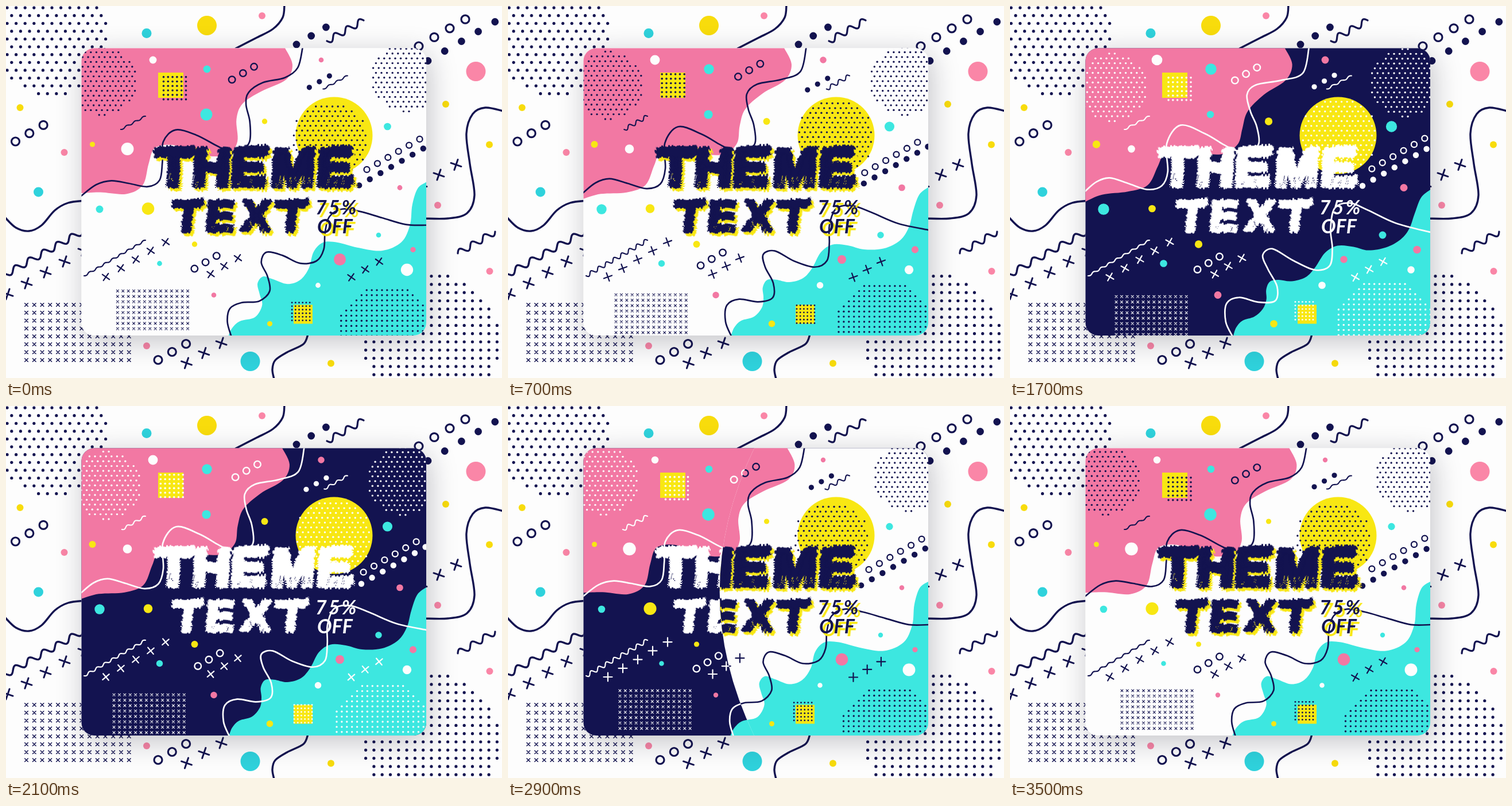
These frames come from a looping animation (864x648 px, 3600 ms). An HTML page with a canvas:

```html
<!DOCTYPE html>
<html lang="en">
<head>
<meta charset="utf-8">
<title>Theme text</title>
<style>
html, body { margin: 0; width: 100%; height: 100%; overflow: hidden; background: #fdfdfd; }
canvas { display: block; }
</style>
</head>
<body>
<canvas id="stage" width="864" height="648" role="img" aria-label="THEME TEXT 75% OFF"></canvas>
<script>
const W = 864, H = 648, LOOP = 3600, TAU = Math.PI * 2;
const g = document.getElementById('stage').getContext('2d');
const NAVY = '#131350', WHITE = '#fdfdfd', PINK = '#f278a3', CYAN = '#3de7e0', YELLOW = '#f8e713';
const BG_PINK = '#fa86a7', BG_CYAN = '#2fd2dc', BG_YELLOW = '#f8dc0c';
const CARD = { x: 131.5, y: 73.5, w: 600.5, h: 500.5, r: 22 };

function disc(x, y, r, color) {
  g.fillStyle = color;
  g.beginPath();
  g.arc(x, y, r, 0, TAU);
  g.fill();
}

function stroke(color, width) {
  g.strokeStyle = color;
  g.lineWidth = width;
  g.stroke();
}

function ring(x, y, r, color, width) {
  g.beginPath();
  g.arc(x, y, r, 0, TAU);
  stroke(color, width);
}

// Repeats a mark n times along a straight row.
function row(n, x, y, dx, dy, mark) {
  for (let i = 0; i < n; i++) mark(x + i * dx, y + i * dy);
}

function plus(x, y, arm, angle, color, width) {
  const c = Math.cos(angle) * arm, s = Math.sin(angle) * arm;
  g.beginPath();
  g.moveTo(x - c, y - s); g.lineTo(x + c, y + s);
  g.moveTo(x + s, y - c); g.lineTo(x - s, y + c);
  stroke(color, width);
}

function crosses(x, y, gap, arm, color, width) {
  for (let j = 0; j < 8; j++)
    row(14, x, y + j * gap, gap, 0, (a, b) => plus(a, b, arm, Math.PI / 4, color, width));
}

// A round patch of dots, in a square or staggered grid.
function dotPatch(cx, cy, R, dx, dy, r, color, stagger) {
  const n = Math.ceil(R / dy);
  for (let j = -n; j <= n; j++)
    for (let i = -n; i <= n; i++) {
      const x = (i + (stagger && j & 1 ? 0.5 : 0)) * dx, y = j * dy;
      if (x * x + y * y <= R * R) disc(cx + x, cy + y, r, color);
    }
}

function wave(x1, y1, x2, y2, turns, amp, color, width) {
  const dx = x2 - x1, dy = y2 - y1, len = Math.hypot(dx, dy), steps = turns * 16;
  g.beginPath();
  for (let i = 0; i <= steps; i++) {
    const u = i / steps, a = amp * Math.sin(u * turns * TAU);
    g.lineTo(x1 + dx * u - dy / len * a, y1 + dy * u + dx / len * a);
  }
  stroke(color, width);
}

// Smooth path through a flat list of coordinates.
function curve(p) {
  const n = p.length / 2, at = i => {
    const k = 2 * Math.max(0, Math.min(n - 1, i));
    return [p[k], p[k + 1]];
  };
  g.beginPath();
  g.moveTo(p[0], p[1]);
  for (let i = 0; i < n - 1; i++) {
    const [a, b, c, d] = [at(i - 1), at(i), at(i + 1), at(i + 2)];
    g.bezierCurveTo(b[0] + (c[0] - a[0]) / 6, b[1] + (c[1] - a[1]) / 6,
      c[0] - (d[0] - b[0]) / 6, c[1] - (d[1] - b[1]) / 6, c[0], c[1]);
  }
}

const mix = (a, b, k) => a.map((v, i) => v + (b[i] - v) * k);

// Each flowing shape swings between two poses.
const pinkBlob = [
  [487,73, 500,102, 489,128, 445,148, 412,168, 401,195, 404,235, 390,258, 355,262, 320,250,
   285,241, 257,247, 247,275, 238,312, 210,328, 165,324, 131,324],
  [478,73, 491,102, 479,130, 442,155, 414,185, 405,215, 397,240, 375,256, 350,258, 320,252,
   295,247, 270,256, 258,280, 240,312, 205,323, 160,329, 131,342]];
const cyanBlob = [
  [732,305, 717,316, 708,345, 705,380, 690,412, 655,427, 610,420, 575,411, 550,411, 534,428, 527,457,
   512,478, 490,485, 465,476, 447,470, 437,482, 441,500, 447,520, 435,542, 408,549, 394,561, 387,575],
  [732,321, 716,335, 705,362, 695,388, 680,406, 655,420, 625,426, 600,420, 572,418, 550,430, 532,455,
   515,472, 490,479, 468,477, 453,481, 447,495, 447,512, 440,528, 425,541, 405,548, 394,560, 389,575]];
const upperLine = [
  [131,332, 158,312, 185,305, 215,309, 248,314, 268,302, 272,270, 274,236, 295,217, 330,225, 365,243,
   388,253, 408,251, 423,236, 424,200, 418,170, 424,150, 450,133, 488,124, 508,106, 516,73],
  [131,322, 150,306, 173,299, 205,309, 238,320, 264,314, 275,290, 273,240, 297,207, 340,222, 372,241,
   390,250, 415,256, 434,240, 430,210, 419,185, 412,155, 426,138, 470,130, 510,118, 521,73]];
const lowerLine = [
  [393,575, 387,550, 392,528, 412,518, 442,514, 459,494, 454,468, 444,445, 456,428, 485,436,
   515,449, 542,442, 553,420, 555,390, 564,364, 588,354, 620,360, 660,371, 700,381, 732,380],
  [387,575, 375,550, 376,518, 398,507, 432,516, 462,515, 466,490, 450,460, 439,435, 455,422,
   490,442, 530,461, 557,455, 562,425, 558,390, 564,352, 590,342, 620,354, 670,378, 732,395]];

// x, y, mean radius, swing, colour
const bubbles = [
  [256,94,7.8,1.8,WHITE], [211.5,249,8.8,-2.8,WHITE], [349,189,8.5,-2.6,CYAN], [350,110,8,2,CYAN],
  [150.5,241,5.6,1.3,YELLOW], [450.5,201,5.6,1.2,YELLOW], [247.5,353,8.7,-2.7,YELLOW],
  [163,354,8,2,CYAN], [328.5,415,5.6,1.2,YELLOW], [267.5,448.5,5.3,1.2,CYAN], [362,503.5,5.3,1.3,PINK],
  [664.5,210,7.9,2,CYAN], [549,94,5.3,1.3,PINK], [686,316.5,5.4,1.3,PINK], [649,399,5.3,1.3,CYAN],
  [581.5,441.5,8.5,-2.6,PINK], [543.5,486.5,5.3,1.2,WHITE], [459.5,553.5,5.4,1.1,YELLOW],
  [698.5,459.5,8.6,-2.7,WHITE], [709,424.5,5.7,1.3,PINK]];

function random(seed) {
  return () => (seed = (seed * 16807) % 2147483647) / 2147483647;
}

function layer() {
  const c = document.createElement('canvas');
  c.width = W; c.height = H;
  return c;
}

// Brush lettering: heavy type with extra dabs, then ragged row by row and column by column.
function lettering(color) {
  const type = layer(), rough = layer(), out = layer(), rnd = random(77);
  const c = type.getContext('2d');
  c.fillStyle = c.strokeStyle = color;
  c.lineJoin = 'round';
  c.textAlign = 'center';
  const word = (text, xs, base, size, edge) => {
    c.font = `bold ${size}px "Liberation Sans", Arial, sans-serif`;
    [...text].forEach((ch, i) => {
      c.save();
      c.transform(1, 0, -0.07, 1, xs[i], base);
      c.lineWidth = edge;
      c.fillText(ch, -3, 0);
      c.strokeText(ch, -3, 0);
      c.restore();
    });
  };
  const dab = (x1, y1, x2, y2, width) => {
    c.lineWidth = width;
    c.beginPath();
    c.moveTo(x1, y1); c.lineTo(x2, y2);
    c.stroke();
  };
  word('THEME', [293, 359, 423, 501, 573], 312.5, 92, 9);
  word('TEXT', [317, 374, 437, 498], 390.5, 74, 7);
  dab(257, 255, 329, 251, 19);
  dab(289, 345, 345, 342, 15);
  dab(468, 345, 528, 342, 15);
  dab(415, 252, 458, 250, 17);
  dab(412, 306, 453, 303, 18);
  dab(564, 252, 600, 250, 17);
  dab(560, 306, 606, 303, 18);
  // Dry streaks left by the bristles.
  c.globalCompositeOperation = 'destination-out';
  for (let i = 0; i < 46; i++) {
    const big = rnd() < 0.6, x = big ? 262 + rnd() * 340 : 292 + rnd() * 230;
    const y = big ? 292 + rnd() * 24 : 374 + rnd() * 20, len = 4 + rnd() * 11;
    dab(x, y, x - 1.5, y + len, 0.6 + rnd() * 0.7);
  }
  const r = rough.getContext('2d'), o = out.getContext('2d');
  for (let y = 225; y < 420; y += 2) r.drawImage(type, 0, y, W, 2, (rnd() - 0.5) * 4, y, W, 2);
  for (let x = 240; x < 640; x += 3) o.drawImage(rough, x, 0, 3, H, x, (rnd() - 0.5) * 4, 3, H);
  o.fillStyle = color;
  o.font = 'italic bold 34px Lato, "Open Sans", sans-serif';
  o.letterSpacing = '3px';
  o.fillText('75%', 539, 362.5);
  o.letterSpacing = '0px';
  o.fillText('OFF', 542, 395.5);
  return out;
}

const words = { [NAVY]: lettering(NAVY), [WHITE]: lettering('#fff'), shadow: lettering(YELLOW) };

function cardPath() {
  g.beginPath();
  g.roundRect(CARD.x, CARD.y, CARD.w, CARD.h, CARD.r);
}

function backdrop() {
  g.fillStyle = '#fdfdfd';
  g.fillRect(0, 0, W, H);
  dotPatch(80, 57.5, 99, 15.6, 13.6, 2.6, NAVY, true);
  dotPatch(741, 585, 118, 14.3, 14.3, 2.6, NAVY, false);
  crosses(35.5, 520.5, 13.75, 4, NAVY, 1.5);
  for (const [x, y, r, color] of [
    [350,34,17,BG_YELLOW], [446,17,6,BG_PINK], [245,47.5,8.5,BG_CYAN], [24.5,177,6,BG_YELLOW],
    [101.5,255,6,BG_PINK], [56.5,324,8.5,BG_CYAN], [818.5,114,17,BG_PINK], [766,171,6,BG_YELLOW],
    [842,241.5,6,BG_YELLOW], [752,347,6,BG_PINK], [842.5,462,6,BG_PINK], [566,622.5,6,BG_YELLOW],
    [425.5,619,17,BG_CYAN], [245,592,6,BG_PINK]]) disc(x, y, r, color);
  const hoop = (x, y) => ring(x, y, 7, NAVY, 3.2);
  const dot = (x, y) => disc(x, y, 6.4, NAVY);
  const cross = (x, y) => plus(x, y, 9.5, 0.33, NAVY, 3);
  row(3, 16.5, 236, 24.3, -14.3, hoop);
  row(3, 265, 616.5, 24.3, -14, hoop);
  row(4, 719, 70, 27, -15.6, hoop);
  row(3, 506, 67, 25.7, -15, dot);
  row(5, 735, 95.5, 29.2, -17, dot);
  row(5, 3, 502, 33, -19, cross);
  row(3, 314.5, 622, 30.3, -17.5, cross);
  row(3, 724, 311.5, 30, -17.5, cross);
  wave(559, 61, 623, 25, 3, 5.5, NAVY, 3.2);
  wave(0, 467, 134, 392, 5.5, 5.5, NAVY, 3.4);
  wave(787, 431, 852, 393, 3, -5.5, NAVY, 3.2);
  for (const p of [
    [-2,368, 17,386, 40,392, 62,382, 85,356, 108,343, 138,339],
    [485,-2, 482,20, 465,40, 435,56, 400,74],
    [728,370, 770,370, 803,361, 816,330, 808,275, 802,222, 813,188, 835,177, 866,183],
    [526,572, 518,589, 490,603, 469,617, 464,633, 467,650]]) {
    curve(p);
    stroke(NAVY, 3.4);
  }
  g.save();
  g.shadowColor = 'rgba(20,20,40,.25)';
  g.shadowBlur = 48;
  g.shadowOffsetX = 5;
  g.shadowOffsetY = 10;
  g.fillStyle = WHITE;
  cardPath();
  g.fill();
  g.restore();
}

function tile(x, y, size, dx, dy, gap, ink) {
  g.fillStyle = YELLOW;
  g.fillRect(x, y, size, size);
  for (let j = 0; j < 6; j++) row(6, dx, dy + j * gap, gap, 0, (a, b) => disc(a, b, gap * 0.23, ink));
}

function artwork(t, dark) {
  const ink = dark ? WHITE : NAVY;
  const slow = Math.cos(TAU * (t - 1400) / LOOP), fast = Math.cos(TAU * (t - 550) / 1800);
  const pose = (1 + slow) / 2;
  const ripple = 2.4 - 1.1 * Math.cos(TAU * t / 1800);
  const spin = Math.PI / 2 * (t - 1100) / 1800;

  g.fillStyle = dark ? NAVY : WHITE;
  g.fillRect(130, 72, 604, 504);
  curve(mix(...pinkBlob, pose));
  g.lineTo(131, 73);
  g.fillStyle = PINK;
  g.fill();
  curve(mix(...cyanBlob, pose));
  g.lineTo(733, 575);
  g.fillStyle = CYAN;
  g.fill();
  disc(571.5, 225.5, 67, YELLOW);

  dotPatch(172 + 6.5 * slow, 136 + 6.5 * slow, 60, 9.6, 8.4, 1.7, ink, true);
  dotPatch(693 - 5.5 * slow, 129 + 5.5 * slow, 60, 9.6, 8.4, 1.7, ink, true);
  dotPatch(568 + 5.5 * slow, 230 - 5 * slow, 67, 9.6, 8.4, 1.7, ink, true);
  dotPatch(658.5 - 7 * slow, 570 - 6.5 * slow, 88, 8.9, 8.9, 1.7, ink, false);
  crosses(190 - 5.7 * slow, 501 + 6 * slow, 9.4, 2.8, ink, 1.1);
  tile(265, 116, 44, 272.7 - 5.2 * fast, 122.3 - 4 * fast, 7.8, ink);
  tile(501, 520.5, 33, 499.5 + 4 * fast, 518 + 4 * fast, 6.2, ink);

  for (const [x, y, r, swing, color] of bubbles) disc(x, y, r + swing * slow, color);

  const hoop = (x, y) => ring(x, y, 5.8, ink, 2.4);
  const bead = (x, y) => ring(x, y, 5, ink, 2.3);
  const dot = (x, y) => disc(x, y, 4.6, ink);
  const cross = (x, y) => plus(x, y, 7.5, spin, ink, 2.2);
  row(3, 395.7 + 6 * fast, 126.8 - 4.3 * fast, 19.2, -11.2, hoop);
  row(3, 330.4 + 6 * fast, 456 - 4.7 * fast, 19.2, -11.2, hoop);
  row(3, 526.5 - 5.5 * fast, 143 + 3.5 * fast, 17.5, -10, dot);
  row(6, 626.5 - 6 * fast, 286.5 + 4.5 * fast, 18.4, -10.6, bead);
  row(7, 616.5 + 3.9 * fast, 311.5 - 2.7 * fast, 18.6, -10.7, (x, y) => disc(x, y, 5.2, ink));
  row(5, 174, 472, 26, -15.2, cross);
  row(3, 356.5, 467, 23.7, -13.9, cross);
  row(3, 601.5, 472.5, 24.2, -13.6, cross);

  wave(200.5 + 2 * fast, 215, 243, 192, 3, ripple, ink, 2.1);
  wave(553 + 2 * fast, 144.5, 595, 121.5, 3, ripple, ink, 2.1);
  wave(136, 470, 243, 408, 8, ripple, ink, 2.2);
  curve(mix(...upperLine, pose));
  stroke(ink, 2.7);
  curve(mix(...lowerLine, pose));
  stroke(ink, 2.7);

  if (!dark) g.drawImage(words.shadow, 4.5, 5);
  g.drawImage(words[ink], 0, 0);
}

// Cubic ease for the curved wipe that swaps the two colour themes.
function wipeAt(u) {
  const v = Math.max(0, Math.min(1, (u - 772) / 610));
  return v < 0.5 ? 4 * v ** 3 : 1 - 4 * (1 - v) ** 3;
}

function draw(t) {
  backdrop();
  g.save();
  cardPath();
  g.clip();
  const toDark = t < LOOP / 2, p = wipeAt(t % (LOOP / 2));
  if (p < 1) artwork(t, !toDark);
  if (p > 0) {
    const dir = toDark ? 1 : -1, from = toDark ? 131 : 732.5;
    const x = from + dir * 601.5 * p, sag = dir * 63 * (4 * p * (1 - p)) ** 0.75;
    g.beginPath();
    g.moveTo(from - dir * 150, 72);
    g.lineTo(x - sag, 72);
    g.quadraticCurveTo(x + sag, 324, x - sag, 576);
    g.lineTo(from - dir * 150, 576);
    g.clip();
    artwork(t, toDark);
  }
  g.restore();
}

g.lineCap = 'round';
g.lineJoin = 'round';
let start, shown;
function tick(now) {
  start ??= now;
  const t = Math.floor((now - start) % LOOP / 100) * 100;
  if (t !== shown) draw(shown = t);
  requestAnimationFrame(tick);
}
requestAnimationFrame(tick);
</script>
</body>
</html>
```
